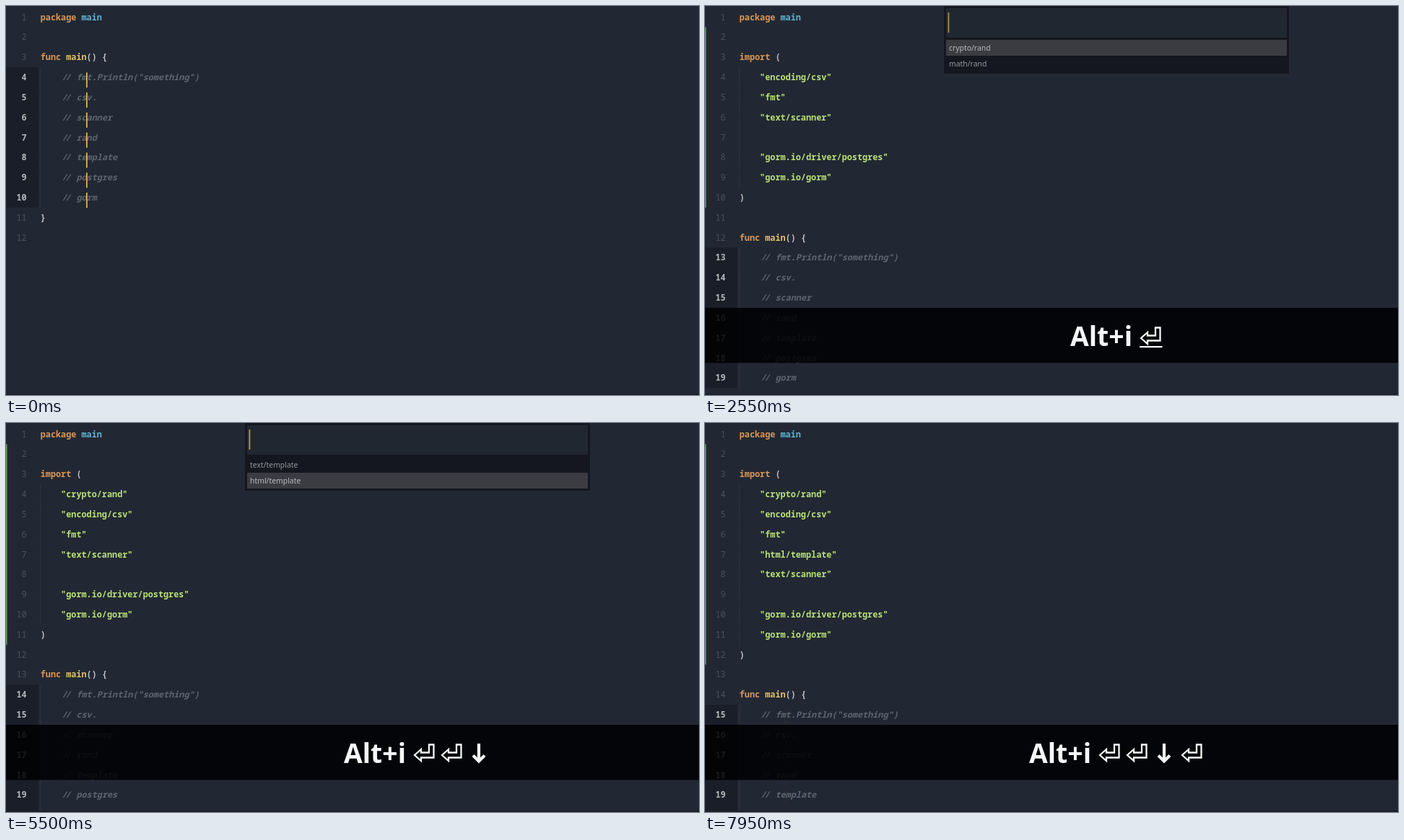
Write an HTML page with a canvas that moves like this. It is 960 by 540 pixels and loops after 8 s.

```html
<!DOCTYPE html>
<html lang="en">
<head>
<meta charset="utf-8">
<title>Go imports</title>
<style>
html, body { margin: 0; height: 100%; overflow: hidden; background: #222833; }
canvas { display: block; }
</style>
</head>
<body>
<canvas id="stage" width="960" height="540"></canvas>
<script>
const ctx = document.getElementById('stage').getContext('2d');
const LOOP = 8000, ROW = 27.82, CHAR = 7.1, LEFT = 47.7, BLINK = 1350;
const MONO = '11.83px "Noto Sans Mono", "DejaVu Sans Mono", monospace';
const SANS = '"Noto Sans", "Open Sans", sans-serif';
const ORANGE = '#dc9656', CYAN = '#5fb4d6', YELLOW = '#e3bf6b',
      GREEN = '#b9e078', PLAIN = '#bfc2c6', GREY = '#5d6570';

// Each stage starts at `at`; its cursor blink starts fading after `peak`.
const stages = [
  { at: 0, peak: -188 },
  { at: 800, peak: 1263, imports: ['encoding/csv', 'fmt'], menu: ['text/scanner', 'go/scanner'] },
  { at: 2050, peak: 2270, imports: ['encoding/csv', 'fmt', 'text/scanner'], menu: ['crypto/rand', 'math/rand'] },
  { at: 3750, peak: 3900, imports: ['crypto/rand', 'encoding/csv', 'fmt', 'text/scanner'], menu: ['text/template', 'html/template'] },
  { at: 5700, peak: 6088, imports: ['crypto/rand', 'encoding/csv', 'fmt', 'html/template', 'text/scanner'] }
];
const DOWN_AT = 4950;
const keyTimes = [550, 2050, 3750, DOWN_AT, 5800];
const keyIcons = ['enter', 'enter', 'down', 'enter'];
const comments = ['fmt.Println("something")', 'csv.', 'scanner', 'rand', 'template', 'postgres', 'gorm'];

function rect(x, y, w, h, color) {
  ctx.fillStyle = color;
  ctx.fillRect(x, y, w, h);
}

function text(str, x, y, font, color, align = 'left') {
  ctx.font = font;
  ctx.fillStyle = color;
  ctx.textAlign = align;
  ctx.fillText(str, x, y);
}

function path(points, width, close) {
  ctx.beginPath();
  points.forEach(([x, y]) => ctx.lineTo(x, y));
  if (close) ctx.closePath();
  ctx.lineWidth = width;
  ctx.strokeStyle = '#f6f7f9';
  ctx.stroke();
}

function cursorAlpha(t, peak) {
  if (t < peak) return 1;
  const wave = 0.5 + 0.65 * Math.cos((t - peak) / BLINK * 2 * Math.PI);
  return Math.min(1, Math.max(0, wave));
}

function cursor(x, y, h, alpha) {
  ctx.globalAlpha = alpha;
  rect(x, y, 1.8, h, '#eebd5c');
  ctx.globalAlpha = 1;
}

// A line is a list of [text, color] parts, or { comment }.
function buildLines(imports) {
  const quoted = name => [['    "' + name + '"', GREEN]];
  const head = [[['package ', ORANGE], ['main', CYAN]], []];
  const block = imports ? [
    [['import ', ORANGE], ['(', PLAIN]],
    ...imports.map(quoted), [],
    quoted('gorm.io/driver/postgres'), quoted('gorm.io/gorm'),
    [[')', PLAIN]], []
  ] : [];
  return [
    ...head, ...block,
    [['func ', ORANGE], ['main', YELLOW], ['() {', PLAIN]],
    ...comments.map(comment => ({ comment })),
    [['}', PLAIN]], []
  ];
}

function guide(first, last) {
  for (let y = 85.5 + (first - 3) * ROW; y < 85.5 + (last - 3) * ROW; y += 3)
    rect(47.3, y, 1, 2, '#343b46');
}

function drawEditor(stage, t) {
  const lines = buildLines(stage.imports);
  const body = lines.findIndex(line => line.comment);
  const end = body + comments.length;
  const rowTop = i => 1.6 + i * ROW;

  rect(0, rowTop(body), 45, comments.length * ROW, '#1a1e28');
  guide(body, end);
  if (stage.imports) {
    guide(3, body - 3);
    rect(0, rowTop(1), 1.6, (body - 3) * ROW, '#5c9a5c');
  }

  lines.forEach((line, i) => {
    const y = 19.6 + i * ROW;
    text(i + 1, 28.6, y, (line.comment ? '600 ' : '') + MONO, line.comment ? '#b3b7bb' : '#48505d', 'right');
    if (line.comment) {
      const font = 'italic 600 ' + MONO, x = LEFT + 4 * CHAR;
      text('/', x + 1.4, y, font, GREY);
      text('/', x + 6.4, y, font, GREY);
      text(line.comment, x + 3 * CHAR, y, font, GREY);
      if (!stage.menu) cursor(111, y - 10.8, 21, cursorAlpha(t, stage.peak));
    } else {
      let x = LEFT;
      for (const [str, color] of line) {
        text(str, x, y, '600 ' + MONO, color);
        x += str.length * CHAR;
      }
    }
  });
  rect(0, 538, 960, 2, '#1b2029');
}

function drawMenu(stage, t) {
  rect(331, 0, 478, 94, '#14171f');
  rect(334, 3, 472, 41, '#212731');
  cursor(336.5, 9, 28, cursorAlpha(t, stage.peak));
  const chosen = t >= DOWN_AT ? 1 : 0;
  rect(334, 47 + chosen * 22, 472, 22, '#3b3c42');
  stage.menu.forEach((item, i) =>
    text(item, 338, 61.5 + i * 22, '10.4px ' + SANS, i === chosen ? '#b9bbbe' : '#94979c'));
}

function drawKeys(t) {
  const count = keyTimes.filter(at => t >= at).length;
  if (!count) return;
  const icons = count - 1;
  const x = icons ? 525 - 19 * icons : 527;
  rect(0, 419, 960, 76.5, 'rgba(0,0,2,.87)');
  text('Alt+i', x, 472, 'bold 37.3px ' + SANS, '#f6f7f9');
  if (!icons) rect(x, 475, 85.5, 2.2, '#f6f7f9');

  keyIcons.slice(0, icons).forEach((icon, i) => {
    const left = x + 97 + 38 * i;
    if (icon === 'enter') {
      path([[1, 461], [10, 453], [10, 457.5], [21, 457.5], [21, 446.5], [27.5, 446.5],
            [27.5, 464.5], [10, 464.5], [10, 469]].map(([px, py]) => [left + px, py]), 2.3, true);
    } else {
      path([[left + 14, 445], [left + 14, 469]], 4.2);
      path([[left + 6, 461.5], [left + 14, 469.5], [left + 22, 461.5]], 4.2);
    }
    if (i === icons - 1 && icons < 3) rect(left - 1, 472, 31.5, 2.2, '#f6f7f9');
  });
}

function frame(now) {
  const t = now % LOOP;
  const stage = stages.filter(s => t >= s.at).pop();
  rect(0, 0, 960, 540, '#222833');
  drawEditor(stage, t);
  if (stage.menu) drawMenu(stage, t);
  drawKeys(t);
  requestAnimationFrame(loop);
}

let start;
function loop(now) {
  start ??= now;
  frame(now - start);
}
requestAnimationFrame(loop);
</script>
</body>
</html>
```
